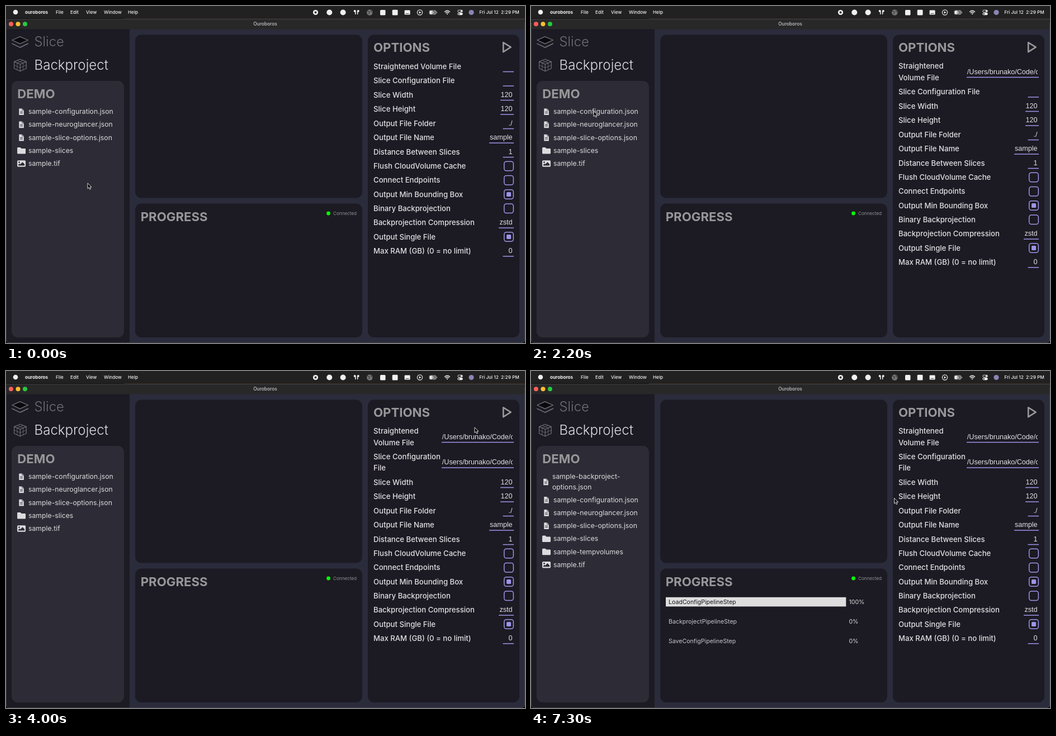
Recreate the animation shown at these times as an HTML page. Size 928 px wide and 603 px high, loop 8000 ms.

```html
<!DOCTYPE html>
<html lang="en">
<head>
<meta charset="utf-8">
<title>Ouroboros</title>
<style>
  html, body { margin: 0; width: 100%; height: 100%; overflow: hidden; background: #000; }
  svg { display: block; width: 100vw; height: 100vh; }
  text { font-family: Inter, sans-serif; white-space: pre; }
  text.field { font-family: "Liberation Sans", Arial, sans-serif; }
</style>
</head>
<body>
<svg viewBox="0 0 928 603">
  <defs><clipPath id="fieldClip"><rect x="779" y="90" width="127" height="100"/></clipPath></defs>
  <g id="chrome"></g>
  <g id="live"></g>
</svg>
<script>
const LOOP = 8000, STEP = 100;
const DROP_TIME = 250;
const BAR = '#212122', PANEL = '#1c1a23', SIDE = '#2d2b35';
const HEADING = '#989799', LABEL = '#e2e1e4', FILE = '#dcdbde', PURPLE = '#9c95e6';
const PATH = '/Users/brunako/Code/ouroboros';

// ---- drawing helpers ----
const text = (x, y, s, size, fill, weight = 400, extra = '') =>
  `<text x="${x}" y="${y}" font-size="${size}" fill="${fill}" font-weight="${weight}" ${extra}>${s}</text>`;
const rect = (x, y, w, h, fill, r = 0, extra = '') =>
  `<rect x="${x}" y="${y}" width="${w}" height="${h}" rx="${r}" fill="${fill}" ${extra}/>`;
const circle = (x, y, r, fill, extra = '') => `<circle cx="${x}" cy="${y}" r="${r}" fill="${fill}" ${extra}/>`;
const path = (d, fill, extra = '') => `<path d="${d}" fill="${fill}" ${extra}/>`;
const line = (d, color, width) => path(d, 'none', `stroke="${color}" stroke-width="${width}" stroke-linejoin="round" stroke-linecap="round"`);
const at = (x, y, body) => `<g transform="translate(${x} ${y})">${body}</g>`;

// ---- motion: monotone cubic through [time, x, y] keys ----
function follow(keys, t) {
  const last = keys.length - 1;
  if (t <= keys[0][0]) return keys[0].slice(1);
  if (t >= keys[last][0]) return keys[last].slice(1);
  const i = keys.findIndex(k => k[0] > t) - 1;
  const h = keys[i + 1][0] - keys[i][0], u = (t - keys[i][0]) / h;
  return [1, 2].map(axis => {
    const slope = j => j < 0 || j >= last ? 0 : (keys[j + 1][axis] - keys[j][axis]) / (keys[j + 1][0] - keys[j][0]);
    const tangent = j => {
      const a = slope(j - 1), b = slope(j);
      return a * b > 0 ? 2 * a * b / (a + b) : 0;
    };
    const p = keys[i][axis], q = keys[i + 1][axis], v = 1 - u;
    return p * v * v * (1 + 2 * u) + q * u * u * (3 - 2 * u)
      + h * u * v * (v * tangent(i) - u * tangent(i + 1));
  });
}

const pointer = [
  [0, 146, 317], [300, 78, 281], [400, 80, 280], [700, 400, 190], [1000, 731.5, 109], [1300, 741.5, 104],
  [1500, 741.5, 104], [2200, 112, 188], [2350, 112, 188], [2700, 564.8, 157.5], [2950, 738, 152],
  [3100, 747, 150], [3600, 747, 150], [4300, 897, 69], [6200, 897, 69], [7100, 663, 227], [7300, 649.5, 227.5]
];
// Each drag: list entry, press and drop times, offset of the dragged copy.
const drags = [
  { file: 'sample.tif', press: 350, drop: 1376,
    keys: [[400, 0, 0], [700, 270, -70], [1000, 654, -160], [1200, 663, -172], [1376, 665, -175]] },
  { file: 'sample-configuration.json', press: 2300, drop: 3110,
    keys: [[2350, 0, 0], [2700, 361.5, -21], [2900, 560, -33], [3050, 633, -39]] }
];

// ---- file list ----
const icons = {
  doc: path('M-4.3 -5.8H1.2L4.3 -2.7V5.8H-4.3Z', FILE)
    + line('M-2 0H2M-2 2.5H2', SIDE, 1) + line('M1.2 -5.5V-2.6H4', SIDE, .7),
  folder: path('M-7.5 -4.5Q-7.5 -5.7 -6.3 -5.7H-2L0 -3.9H6.3Q7.5 -3.9 7.5 -2.7V4.5Q7.5 5.7 6.3 5.7H-6.3Q-7.5 5.7 -7.5 4.5Z', FILE),
  image: rect(-7.5, -5.7, 15, 11.4, FILE, 1.6) + circle(-4, -2.4, 1.4, SIDE)
    + path('M-5.6 3.6V2L-3.4 0L-2 1.2L1.8 -2.8L5.6 1V3.6Z', SIDE)
};
const iconFor = name => icons[name.endsWith('.json') ? 'doc' : name.endsWith('.tif') ? 'image' : 'folder'];
const fileEntry = (name, y) => at(27.6, y, iconFor(name)) + text(40, y + 4, name, 12.25, FILE);

function fileList(t) {
  const names = ['sample-configuration.json', 'sample-neuroglancer.json', 'sample-slice-options.json', 'sample-slices', 'sample.tif'];
  const saved = t >= 5300;
  let y = 189.2, out = '';
  if (saved) {
    out += at(26.6, 198.5, icons.doc) + text(38, 193.2, 'sample-backproject-', 12.25, FILE)
      + text(38, 211.5, 'options.json', 12.25, FILE);
    names.splice(4, 0, 'sample-tempvolumes');
    y = 230.7;
  }
  for (const name of names) {
    const returning = drags.some(d => d.file === name && t >= d.drop && t < d.drop + DROP_TIME);
    if (!returning) out += fileEntry(name, y);
    y += 23.2;
  }
  return out;
}

function draggedCopies(t) {
  return drags.map(d => {
    if (t < d.press || t >= d.drop + DROP_TIME) return '';
    const left = t < d.drop ? 1 : (1 - (t - d.drop) / DROP_TIME) ** 2.2;
    const [dx, dy] = follow(d.keys, t);
    return at(dx * left, dy * left, fileEntry(d.file, d.file === 'sample.tif' ? 282 : 189.2));
  }).join('');
}

// ---- options ----
const options = [
  ['Straightened Volume File', ''], ['Slice Configuration File', ''], ['Slice Width', '120'], ['Slice Height', '120'],
  ['Output File Folder', './'], ['Output File Name', 'sample'], ['Distance Between Slices', '1'],
  ['Flush CloudVolume Cache', false], ['Connect Endpoints', false], ['Output Min Bounding Box', true],
  ['Binary Backprojection', false], ['Backprojection Compression', 'zstd'], ['Output Single File', true],
  ['Max RAM (GB) (0 = no limit)', '0']
];
const fieldWidth = { '120': 24, sample: 44, zstd: 27 };
const wrapped = [['Straightened', 'Volume File'], ['Slice Configuration', 'File']];

function optionList(t) {
  const filled = [t >= drags[0].drop, t >= drags[1].drop];
  const over = t >= 900 && t < 1080 ? 1 : t >= 1080 && t < drags[0].drop ? 0 : t >= 2850 && t < drags[1].drop ? 1 : -1;
  let y = 107.9, out = '';
  options.forEach(([label, value], i) => {
    const dim = i === over;
    const name = (s, dy) => text(657, y + dy, s, 13.15, dim ? '#77757c' : LABEL, dim ? 600 : 500);
    const underline = (w, dy) => rect(908 - w, y + dy, w, 1.5, dim ? '#5d5a78' : PURPLE);
    if (filled[i]) {
      out += name(wrapped[i][0], 4.4) + name(wrapped[i][1], 24.7) + underline(129, 18.9)
        + text(779.8, y + 13.8, PATH, 12.6, LABEL, 400, 'class="field" clip-path="url(#fieldClip)"');
      y += 45.5;
      return;
    }
    out += name(label, 4.6);
    if (typeof value === 'boolean') {
      out += rect(890.7, y - 8.2, 16.6, 16.6, 'none', 4, `stroke="${PURPLE}" stroke-width="1.5"`);
      if (value) out += rect(895, y - 3.9, 8, 8, PURPLE, 1.5);
      y += 25.25;
    } else {
      out += underline(fieldWidth[value] || 19.5, 8.9)
        + text(905.6, y + 3.8, value, 12.6, LABEL, 400, 'class="field" text-anchor="end"');
      y += 25.5;
    }
  });
  const hover = t >= 4200 && t < 6400;
  return out + line('M889.2 65.3L902.6 73.7L889.2 82.2Z', hover ? '#f2f2f2' : HEADING, 2.7);
}

// ---- progress ----
function progress(t) {
  if (t < 4800) return '';
  return ['Load', 'Backproject', 'Save'].map((step, i) => {
    const done = i === 0 && t >= 6700, y = 413 + 35.3 * i;
    const name = step + (i === 1 ? '' : 'Config') + 'PipelineStep';
    return (done ? rect(241, y - 8.2, 322.3, 16.6, '#dedede') : '')
      + text(246, y + 3.8, name, 10.6, done ? '#17151c' : '#c9c8cc')
      + text(568.4, y + 3.8, done ? '100%' : '0%', 10.6, '#dcdbde');
  }).join('');
}

// ---- pointer ----
function cursor(t) {
  const [x, y] = follow(pointer, t);
  const pressed = drags.some(d => t >= d.press && t < d.drop);
  const outline = 'stroke="#f4f4f4" stroke-width=".9" stroke-linejoin="round"';
  const arrow = path('M0 0V9.6L2.2 7.6L3.8 11.1L5.6 10.3L4 7H7Z', '#000', outline);
  const hand = path('M1 1.2Q2.1 .4 2.8 1.6L4.2 4.8L5.2 4.4L6.3 4.6L7.3 5L8.3 5.8L8.6 8.6L7.8 11.4L4 11.8L.6 8.8Q-.6 7.3 1 7.2L2.3 7.9L.6 2.4Q.4 1.7 1 1.2Z', '#000', outline);
  return (pressed ? circle(x + .3, y + 1.3, 13.8, '#808080', 'fill-opacity=".07" stroke="#929196" stroke-width="1.1"') : '')
    + at(x, y, t >= 4200 && t < 6400 ? hand : arrow);
}

// ---- fixed parts ----
function menuBar() {
  const white = '#f0f0f0';
  const item = (x, s, weight = 500) => text(x, 14, s, 8.2, white, weight);
  const ring = (x, r) => circle(x, 11.5, r, 'none', `stroke="${white}" stroke-width="1.2"`);
  return rect(0, 0, 928, 22.5, BAR) + circle(17, 11, 4.3, white) + item(34, 'ouroboros', 700)
    + [[89, 'File'], [115, 'Edit'], [143, 'View'], [175, 'Window'], [218, 'Help']].map(m => item(...m)).join('')
    + circle(553.5, 11.5, 4.6, white) + rect(551.8, 9.8, 3.4, 3.4, BAR, .8)
    + circle(578.3, 11.5, 5, white) + circle(602.6, 11.5, 5, white)
    + line('M624.8 9V14.5M628.6 9V14.5', white, 1.5) + circle(623.6, 9, 1.9, white) + circle(629.8, 9, 1.9, white)
    + circle(650.3, 11.5, 5.2, '#777') + line('M646.5 9L650 10.5L649 14M652 8L654 11', '#333', 1.2)
    + rect(669, 7, 9.5, 9.5, white, 1.5) + rect(690.7, 6.8, 9.8, 9.6, white, 1.5)
    + rect(712.6, 7.5, 10, 8, white, 1.2) + line('M715 13.5H720', '#333', .9)
    + ring(740, 4.6) + path('M738.6 9.2L742.4 11.5L738.6 13.8Z', white)
    + rect(757, 8, 12, 7, '#777', 2, 'stroke="#aaa" stroke-width=".8"') + rect(757.8, 8.8, 6, 5.4, white, 1)
    + rect(769.8, 10, 1.2, 3, '#999', .5) + path('M764.5 7L761.2 12H763.4L762.4 16L766 10.7H763.8Z', white, `stroke="${BAR}" stroke-width=".5"`)
    + line('M784.5 10.2Q789 6.2 793.5 10.2M786.3 12.2Q789 9.8 791.7 12.2', white, 1.4) + circle(789, 14.2, 1.1, white)
    + rect(807.8, 7.3, 8.6, 3.6, 'none', 1.8, `stroke="${white}" stroke-width=".9"`) + circle(814.4, 9.1, 1.5, white)
    + rect(807.4, 12, 9.4, 4.2, white, 2.1) + circle(809.8, 14.1, 1.2, BAR)
    + circle(832, 11.5, 4.6, '#8e83b4')
    + item(846.3, 'Fri Jul 12  2:29 PM');
}

function chrome() {
  const cube = '#6f6d76';
  const heading = (x, y, s) => text(x, y, s, 22.2, HEADING, 700);
  return rect(0, 0, 928, 603, '#000') + menuBar() + rect(211, 22, 717, 1, '#33271c')
    + path('M0 23.5H928V597Q928 602.5 922 602.5H6Q0 602.5 0 597Z', '#2a2c3b')
    + path('M0 41H221V602.5H6Q0 602.5 0 597Z', PANEL)
    + rect(0, 23.5, 928, 18, '#282829') + rect(0, 23.3, 928, .8, '#4a4a4c')
    + path('M.4 30V597Q.4 602.5 6 602.5H922Q927.6 602.5 927.6 597V30', 'none', 'stroke="#4b4b52" stroke-width=".8"')
    + circle(9, 32.2, 4, '#ff5f57') + circle(21.5, 32.2, 4, '#febc2e') + circle(34, 32.2, 4, '#28c840')
    + text(463.5, 35, 'Ouroboros', 8.3, '#b4b4b6', 600, 'text-anchor="middle"')
    + path('M11 61L25 54.8L39.4 61L25 67.6Z', '#0b0a0e', 'stroke="#77757c" stroke-width="1.3" stroke-linejoin="round"')
    + line('M11 67.3L25 74.2L39.4 67.3', '#77757c', 1.5)
    + text(50.5, 72.3, 'Slice', 23.8, '#706e77', 300)
    + line('M25.4 95.2L36.3 99.6V111.8L25.4 116.8L14.6 111.8V99.6ZM14.6 99.6L25.4 104.2L36.3 99.6M25.4 104.2V116.8', cube, 1.2)
    + line('M20 97.4L30.8 101.9V114.2M30.8 97.4L20 101.9V114.2M14.6 105.7L25.4 110.5L36.3 105.7', cube, .8)
    + text(50.5, 113.7, 'Backproject', 24.1, '#dddce0', 300)
    + rect(10, 134, 201, 459, SIDE, 11)
    + rect(231, 51.5, 406, 292, PANEL, 11) + rect(231, 353.5, 406, 239.5, PANEL, 11)
    + rect(647, 51.5, 271, 541.5, PANEL, 11)
    + heading(20.3, 165, 'DEMO') + heading(240.7, 384.8, 'PROGRESS') + heading(657, 82.3, 'OPTIONS')
    + circle(576.5, 371, 3.4, '#0f0') + text(627, 373.6, 'Connected', 8.1, '#918f95', 400, 'text-anchor="end"');
}

const live = document.getElementById('live');
document.getElementById('chrome').innerHTML = chrome();
let shown = -1;
const start = performance.now();
function tick() {
  const elapsed = (performance.now() - start) % LOOP;
  const t = Math.floor(elapsed / STEP) * STEP;
  if (t !== shown) {
    shown = t;
    live.innerHTML = fileList(t) + optionList(t) + progress(t) + draggedCopies(t) + cursor(t);
  }
  requestAnimationFrame(tick);
}
tick();
</script>
</body>
</html>
```
